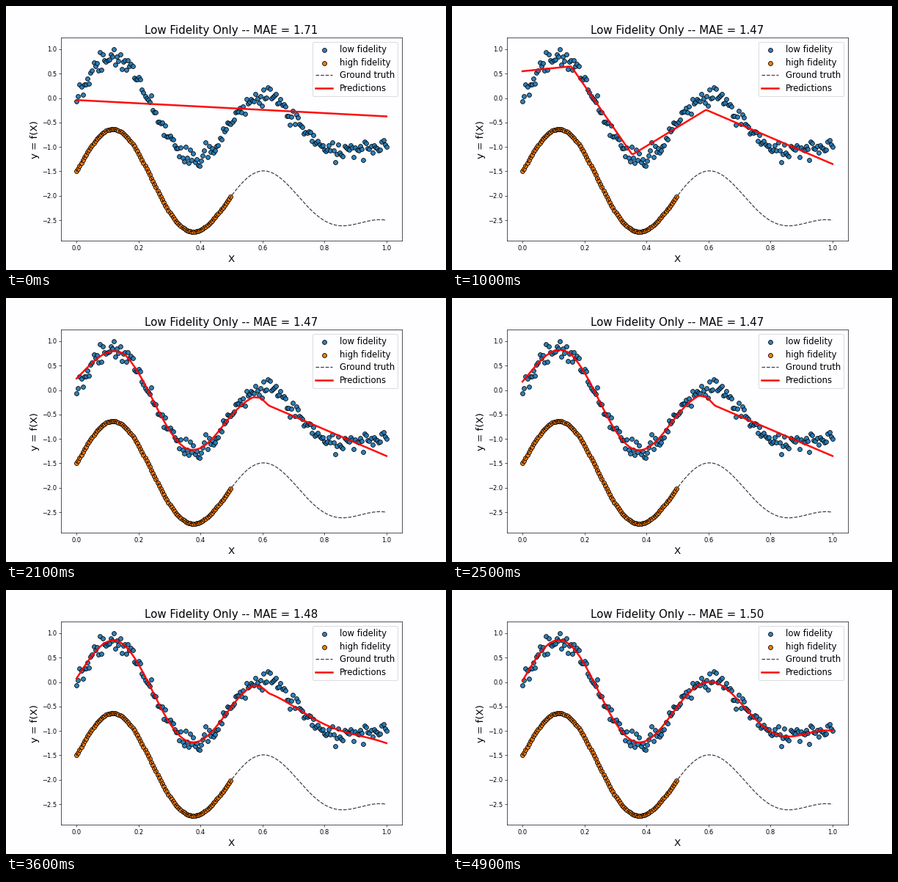
These frames come from a looping animation (600x360 px, 5 s). A matplotlib script:

```python
import numpy as np
import matplotlib.pyplot as plt
from matplotlib.animation import FuncAnimation

FRAMES, INTERVAL = 50, 100
BEND_STEP, LATE_STEP = 10, 29
PAPER = "#fefdff"
plt.rcParams["font.family"] = "DejaVu Sans"


def wave(x):
    return (1 - x**2) * np.sin(4 * np.pi * x) - x


def smoothstep(t):
    t = np.clip(t, 0, 1)
    return t * t * (3 - 2 * t)


X = np.linspace(0, 1, 200)
HIGH = wave(X) - 1.5
noise = np.random.default_rng(4).normal(0, 0.095, X.size)
LOW = wave(X) + np.clip(noise, -0.22, 0.22)

# The fit starts as a line, bends into a polyline, then settles on the wave
START = -0.04 - 0.335 * X
BENT = np.interp(X, [0, 0.157, 0.354, 0.592, 1],
                 [0.55, 0.65, -1.16, -0.24, -1.35])
SETTLE_TIME = np.interp(X, [0, 0.25, 0.45, 0.6], [13, 4, 4, 12])
LATE_SIDE = np.clip((X - 0.57) / 0.05, 0, 1)


def prediction(step):
    if step < BEND_STEP:
        return START + (BENT - START) * step / BEND_STEP
    early = 1 - np.exp((BEND_STEP - step) / SETTLE_TIME)
    late = smoothstep((step - LATE_STEP) / (FRAMES - 1 - LATE_STEP))
    weight = early + (late - early) * LATE_SIDE
    return BENT + (wave(X) - BENT) * weight


fig, ax = plt.subplots(figsize=(10, 6), dpi=60, facecolor=PAPER)
fig.subplots_adjust(left=0.125, right=0.9, bottom=0.11, top=0.88)
ax.set_facecolor(PAPER)
dots = dict(s=50, edgecolors="black", linewidths=1)
ax.scatter(X, LOW, color="C0", alpha=0.93, label="low fidelity", **dots)
ax.scatter(X[:100], HIGH[:100], color="C1", label="high fidelity", **dots)
ax.plot(X, HIGH, "k--", lw=1.5, alpha=0.75, label="Ground truth")
line, = ax.plot(X, prediction(0), color="red", lw=3, alpha=0.95,
                label="Predictions")
ax.set(xlim=(-0.05, 1.05), ylim=(-2.926, 1.237))
ax.set_xlabel("X", fontsize=16)
ax.set_ylabel("y = f(X)", fontsize=16)
title = ax.set_title("", fontsize=18)
ax.legend(loc="upper right", fontsize=14, facecolor=PAPER,
          labelspacing=0.4, borderpad=0.35)


def draw(step):
    fit = prediction(step)
    line.set_ydata(fit)
    error = np.abs(fit - HIGH).mean()
    title.set_text(f"Low Fidelity Only -- MAE = {error:.2f}")
    return line, title


anim = FuncAnimation(fig, draw, frames=FRAMES, interval=INTERVAL,
                     repeat=True, repeat_delay=0)
plt.show()
```
